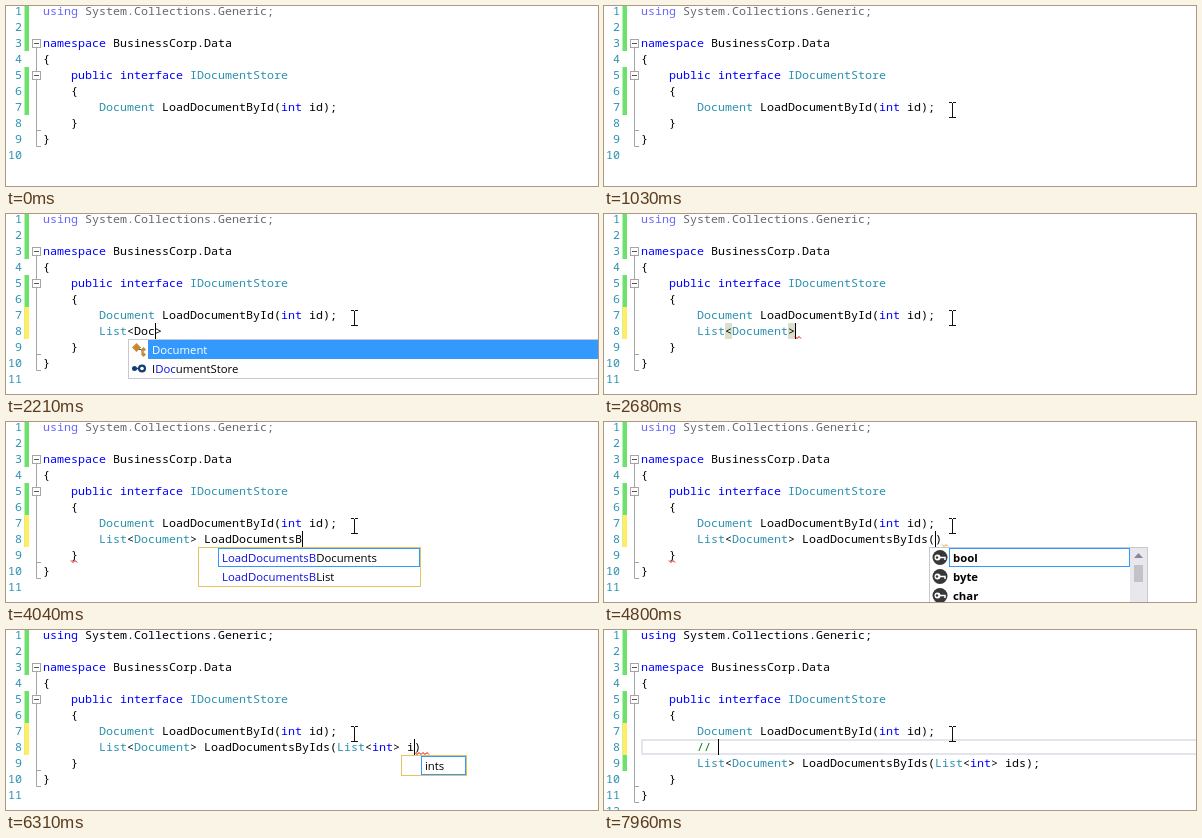
Recreate the animation shown at these times as an HTML page with a canvas. Size 592 by 180 pixels, loop 8 s.

```html
<!DOCTYPE html>
<html lang="en">
<head>
<meta charset="utf-8">
<title>Typing a method signature</title>
<style>
  html, body { margin: 0; width: 100%; height: 100%; overflow: hidden; background: #fff; }
  canvas { display: block; }
</style>
</head>
<body>
<canvas id="stage" width="592" height="180"></canvas>
<script>
const ctx = document.getElementById("stage").getContext("2d");
const LOOP = 8000, LINE = 16, CHAR = 7, TEXT_X = 37, ROW = 19;
const CODE_FONT = '11.667px "Noto Sans Mono", monospace';
const LIST_FONT = '11.35px "Open Sans", sans-serif';
const TEAL = "#2b91af", BLUE = "#0000ff", RED = "#e00000", ORANGE = "#e8963c";
const GREEN_BAR = "#6ce26c", YELLOW_BAR = "#ffee62";

const CLICK = 1260, NEW_LINE = 1310, USING_RESOLVED = 5700;
const SAVE = 7260, CARET_UP = 7340, COMMENT = 7680;

// Text of the typed line over time; "|" marks the caret.
const edits = [];
const edit = (time, text) => edits.push([time, text]);
function type(start, gap, before, word, after = "") {
  for (let i = 0; i < word.length; i++)
    edit(start + gap * i, before + word.slice(0, i + 1) + "|" + after);
}
const result = "List<Document>";
const method = result + " LoadDocumentsByIds(";
edit(NEW_LINE, "|");
type(1450, 115, "", "List");
edit(1930, "List<|>");
type(2010, 80, "List<", "Document", ">");
edit(2680, result + "|");
type(2830, 56, result, " LoadDocuments");
edit(3710, result + " LoadDocumentsB|");
type(4140, 110, result + " LoadDocumentsB", "yIds");
edit(4530, method + "|)");
type(4990, 60, method, "List", ")");
edit(5300, method + "List<|>)");
type(5400, 110, method + "List<", "int", ">)");
edit(5830, method + "List<int>|)");
edit(5950, method + "List<int> |)");
edit(6270, method + "List<int> i|)");
edit(6360, method + "List<int> id|)");
edit(6590, method + "List<int> ids|)");
edit(6920, method + "List<int> ids)|");
edit(7120, method + "List<int> ids);|");

// Completion rows: label, matched part, icon.
const listTypes = [["List<>", "List", "class"], ["IList<>", "List", "interface"],
                   ["IReadOnlyList<>", "List", "interface"]];
const docTypes = [["Document", "Doc", "class"], ["IDocumentStore", "Doc", "interface"]];
const keywords = ["bool", "byte", "char"].map(word => [word, "", "key"]);
const suffixed = (stem, ...ends) => ends.map(end => [stem + end, stem]);

const popups = [
  { from: 1565, to: 1930, x: 87, right: 600, rows: listTypes, solid: true },
  { from: 2010, to: 2680, x: 122, right: 600, rows: docTypes, solid: true },
  { from: 2886, to: 2942, x: 192, right: 326, rows: suffixed("L", "Documents", "List") },
  { from: 3800, to: 4140, x: 192, right: 415, rows: suffixed("LoadDocumentsB", "Documents", "List") },
  { from: 4650, to: 4990, x: 325, right: 544, rows: keywords, scroll: true },
  { from: 5050, to: 5300, x: 325, right: 600, rows: listTypes, solid: true },
  { from: 5400, to: 5830, x: 360, right: 540, rows: [["int", "", "key"]], solid: true },
  { from: 6310, to: 6360, x: 395, right: 461, rows: [["ints", ""]] },
  { from: 6360, to: 6590, x: 395, right: 470, rows: suffixed("id", "Ints", "List") },
  { from: 6590, to: 6730, x: 395, right: 476, rows: suffixed("ids", "Ints", "List") }
];

const squiggles = [
  { from: 2680, to: 2830, x: 191, width: 7, line: 8, color: RED },
  { from: 2886, to: USING_RESOLVED, x: 65, width: 7, line: 9, color: RED },
  { from: 4700, to: 4990, x: 338, width: 7, line: 8, color: ORANGE },
  { from: 6310, to: 6730, x: 409, width: 15, line: 8, color: RED },
  { from: 6920, to: 7120, x: 436, width: 8, line: 8, color: RED }
];

// Columns of matching brackets highlighted on the typed line.
const brackets = [
  { from: 2680, to: 2830, columns: [4, 13] },
  { from: 6920, to: 7120, columns: [33, 47] }
];

const pointerPath = [[650, 487, 176], [860, 251, 92], [930, 262, 82], [1030, 348, 104]];

const active = (item, t) => t >= item.from && t < item.to;
const lineTop = n => LINE * (n - 1) - 3;
const baseline = n => lineTop(n) + 12;

function fill(color, x, y, w, h) {
  ctx.fillStyle = color;
  ctx.fillRect(x, y, w, h);
}

function stroke(color, width, points) {
  ctx.strokeStyle = color;
  ctx.lineWidth = width;
  ctx.beginPath();
  for (const [x, y] of points) ctx.lineTo(x, y);
  ctx.stroke();
}

function disc(color, x, y, r) {
  ctx.fillStyle = color;
  ctx.beginPath();
  ctx.arc(x, y, r, 0, 7);
  ctx.fill();
}

function tokenColor(token) {
  if (token.startsWith("//")) return "#008000";
  if (/^(using|namespace|public|interface|int)$/.test(token)) return BLUE;
  if (/^(IDocumentStore|Document|List<)$/.test(token)) return TEAL;
  return "#000";
}

function drawCode(text, n) {
  ctx.font = CODE_FONT;
  for (const match of text.matchAll(/\/\/.*|List<|\w+|[^\w\s]/g)) {
    const x = TEXT_X + CHAR * match.index;
    ctx.fillStyle = tokenColor(match[0]);
    if (match[0] === "List<") {
      ctx.fillText("List", x, baseline(n));
      ctx.fillStyle = "#000";
      ctx.fillText("<", x + 4 * CHAR, baseline(n));
    } else {
      ctx.fillText(match[0], x, baseline(n));
    }
  }
}

function drawGutter(t, lineCount) {
  ctx.font = CODE_FONT;
  ctx.fillStyle = TEAL;
  ctx.textAlign = "right";
  for (let n = 1; n <= lineCount; n++) ctx.fillText(n, 16, baseline(n));
  ctx.textAlign = "left";

  const bar = (color, first, last) =>
    fill(color, 18.5, lineTop(first), 4.5, LINE * (last - first + 1));
  bar(GREEN_BAR, 1, 3);
  bar(GREEN_BAR, 5, t < NEW_LINE ? 7 : t >= COMMENT ? 9 : 8);
  if (t >= NEW_LINE && t < SAVE || t >= COMMENT) bar(YELLOW_BAR, 7, 8);

  const grey = "#a5a5a5", end = lineTop(lineCount) - .5;
  stroke(grey, 1, [[30.5, 42], [30.5, end], [35, end]]);
  stroke(grey, 1, [[30.5, end - LINE], [35, end - LINE]]);
  for (const n of [3, 5]) {
    const y = lineTop(n) + 4;
    fill("#fff", 26, y, 9, 9);
    ctx.strokeRect(26.5, y + .5, 8, 8);
    stroke("#555", 1, [[28, y + 4.5], [33, y + 4.5]]);
    ctx.strokeStyle = grey;
  }
}

const icons = {
  class(x, y) {
    stroke("#555", 1, [[x - 1, y], [x + 3, y], [x + 3, y + 4], [x + 5, y + 4]]);
    ctx.fillStyle = "#c98a2e";
    for (const [dx, dy, r] of [[-2.5, -2, 4.5], [4.5, 0, 2.5], [4.5, 5, 2.5]]) {
      ctx.beginPath();
      ctx.moveTo(x + dx - r, y + dy);
      ctx.lineTo(x + dx, y + dy - r);
      ctx.lineTo(x + dx + r, y + dy);
      ctx.lineTo(x + dx, y + dy + r);
      ctx.fill();
    }
  },
  interface(x, y) {
    const navy = "#123f73";
    stroke(navy, 1.5, [[x - 4, y], [x + 3, y]]);
    disc(navy, x - 4.5, y, 2.5);
    disc(navy, x + 3, y, 4);
    disc("#fff", x + 3, y, 1.8);
  },
  key(x, y) {
    disc("#383838", x, y, 7.5);
    stroke("#fff", 1.5, [[x - 1, y], [x + 5, y], [x + 5, y + 2.5]]);
    disc("#fff", x - 2.5, y, 3);
    disc("#383838", x - 3, y, 1.2);
  }
};

function drawLabel([label, match, icon], x, y, selected) {
  ctx.font = (icon === "key" ? "bold " : "") + LIST_FONT;
  const at = label.indexOf(match);
  const parts = [label.slice(0, at), match, label.slice(at + match.length)];
  parts.forEach((part, i) => {
    ctx.fillStyle = selected ? "#fff" : i === 1 ? "#1010e0" : "#000";
    ctx.fillText(part, x, y);
    x += ctx.measureText(part).width;
  });
}

function drawPopup({ x, right, rows, solid, scroll }) {
  const top = lineTop(9), height = rows.length * ROW + 2, blue = "#3399ff";
  const inner = right - (scroll ? 18 : 1);
  fill("#fff", x, top, right - x, height);
  ctx.lineWidth = 1;
  ctx.strokeStyle = rows[0][2] ? "#c6c8d2" : "#e5c365";
  ctx.strokeRect(x + .5, top + .5, right - x - 1, height - 1);
  if (solid) {
    fill(blue, x + 20, top + 1, inner - x - 20, ROW);
  } else {
    ctx.strokeStyle = blue;
    ctx.strokeRect(x + 20.5, top + 1.5, inner - x - 21, ROW - 1);
  }
  rows.forEach((row, i) => {
    const y = top + 1 + ROW * i;
    if (row[2]) icons[row[2]](x + 11, y + 9.5);
    drawLabel(row, x + 24, y + 13.5, solid && i === 0);
  });
  if (scroll) {
    fill("#e8e8ec", inner, top + 1, 17, height - 2);
    fill("#c2c3c9", inner + 4, top + 18, 9, 17);
    ctx.fillStyle = "#868999";
    ctx.beginPath();
    ctx.moveTo(inner + 4, top + 11);
    ctx.lineTo(inner + 8.5, top + 6);
    ctx.lineTo(inner + 13, top + 11);
    ctx.fill();
  }
}

function drawSquiggle({ x, width, line, color }) {
  const y = lineTop(line) + 13, points = [];
  for (let i = 0; i <= width; i += 2) points.push([x + i, y + (i % 4 ? 2.5 : .5)]);
  stroke(color, 1, points);
}

function pointerAt(t) {
  if (t >= 40 && t < 80) return [489, 182];
  if (t < 650) return null;
  const time = Math.min(1030, 650 + Math.floor((t - 650) / 47.5) * 47.5);
  const next = Math.max(1, pointerPath.findIndex(point => point[0] >= time));
  const [t0, x0, y0] = pointerPath[next - 1], [t1, x1, y1] = pointerPath[next];
  const part = (time - t0) / (t1 - t0);
  return [Math.round(x0 + (x1 - x0) * part), Math.round(y0 + (y1 - y0) * part)];
}

function drawPointer([x, y]) {
  fill("#111", x, y - 7, 1, 15);
  for (const edge of [y - 8, y + 7]) {
    fill("#111", x - 3, edge, 3, 1);
    fill("#111", x + 1, edge, 3, 1);
  }
}

function drawCaret(n, column, highlighted) {
  const y = lineTop(n);
  if (highlighted) {
    ctx.strokeStyle = "#e4e4ec";
    ctx.lineWidth = 2;
    ctx.strokeRect(TEXT_X + 1, y + 1, 570, LINE - 2);
  }
  fill("#000", TEXT_X + CHAR * column, y, 1, LINE);
}

function draw(t) {
  fill("#fff", 0, 0, 592, 180);
  const lines = ["using System.Collections.Generic;", "", "namespace BusinessCorp.Data", "{",
    "    public interface IDocumentStore", "    {", "        Document LoadDocumentById(int id);"];
  const indent = " ".repeat(8), lineSevenEnd = lines[6].length;
  let caret = t >= CLICK ? [7, lineSevenEnd, true] : null;

  if (t >= COMMENT) {
    const comment = "// ".slice(0, Math.floor((t - COMMENT) / 80));
    lines.push(indent + comment);
    caret = [8, 8 + comment.length, true];
  }
  if (t >= NEW_LINE) {
    const typed = indent + edits.findLast(([time]) => time <= t)[1];
    lines.push(typed.replace("|", ""));
    if (t < CARET_UP) caret = [8, typed.indexOf("|"), false];
  }
  lines.push("    }", "}", "");

  for (const pair of brackets) {
    if (!active(pair, t)) continue;
    for (const column of pair.columns)
      fill("#dbe0cc", TEXT_X + CHAR * (8 + column), lineTop(8), CHAR, LINE);
  }
  if (caret) drawCaret(...caret);
  drawGutter(t, lines.length);
  lines.forEach((text, i) => {
    ctx.globalAlpha = i === 0 && t < USING_RESOLVED ? .6 : 1;
    drawCode(text, i + 1);
  });
  ctx.globalAlpha = 1;
  for (const squiggle of squiggles) if (active(squiggle, t)) drawSquiggle(squiggle);
  for (const popup of popups) if (active(popup, t)) drawPopup(popup);
  const pointer = pointerAt(t);
  if (pointer) drawPointer(pointer);
}

const start = performance.now();
function frame() {
  draw((performance.now() - start) % LOOP);
  requestAnimationFrame(frame);
}
frame();
</script>
</body>
</html>
```
